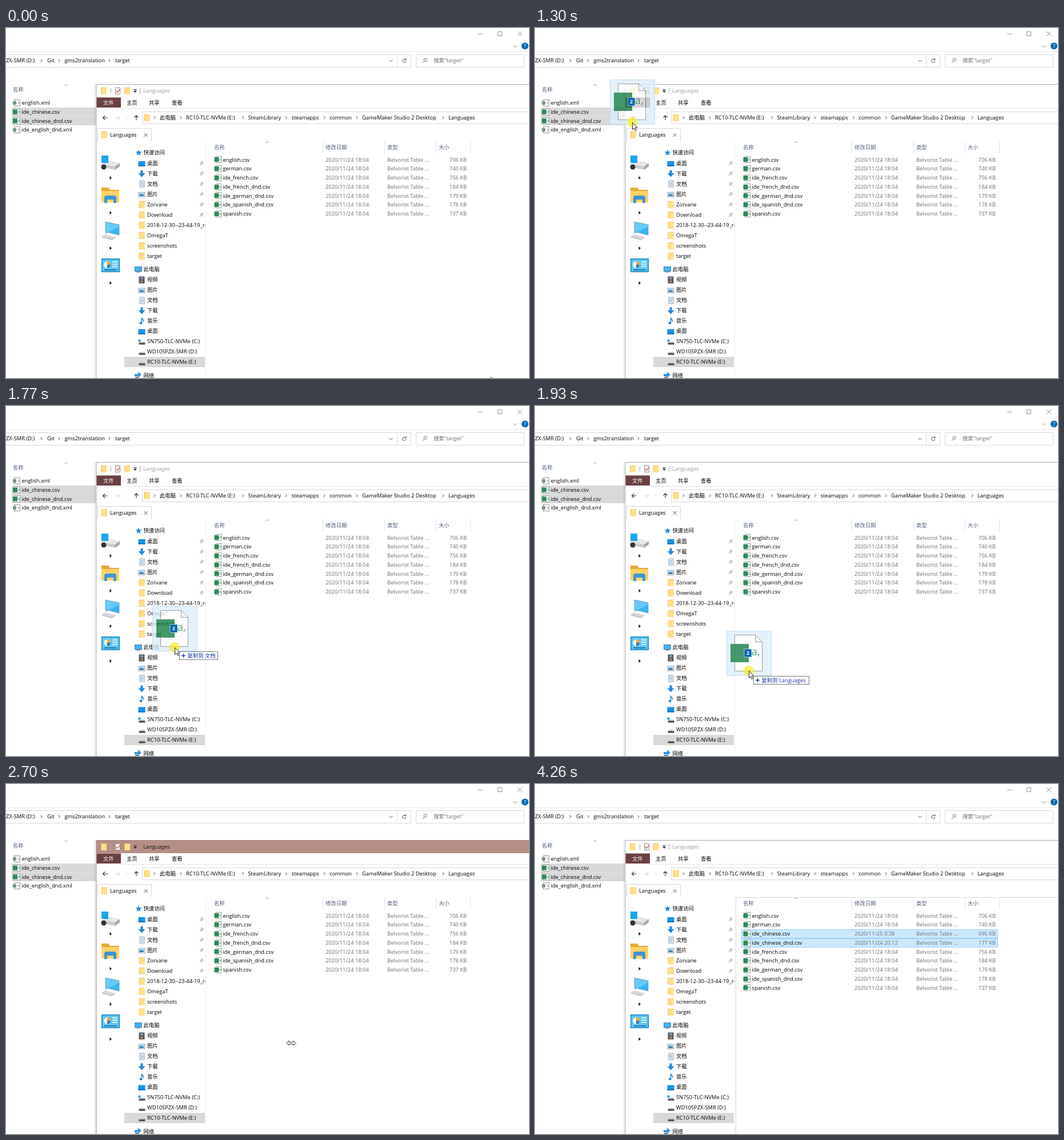
An HTML page that plays this animation: 915 px wide and 612 px high, repeating every 4330 ms.

```html
<!DOCTYPE html>
<html lang="zh">
<head>
<meta charset="utf-8">
<style>
html, body { margin: 0; width: 100%; height: 100%; overflow: hidden; background: #fff; }
svg { display: block; }
text { font: 9.33px "Open Sans", "Noto Sans CJK SC", "Noto Sans CJK", sans-serif; white-space: pre; }
</style>
</head>
<body>
<svg id="stage" width="915" height="612"></svg>
<script>
const rect = (x, y, w, h, fill, more = '') =>
  `<rect x="${x}" y="${y}" width="${w}" height="${h}" fill="${fill}" ${more}/>`;
const box = (x, y, w, h, fill, stroke) =>
  rect(x + .5, y + .5, w - 1, h - 1, fill, `stroke="${stroke}"`);
const shape = (d, fill, more = '') => `<path d="${d}" fill="${fill}" ${more}/>`;
const line = (d, stroke = '#444', w = 1, more = '') =>
  shape(d, 'none', `stroke="${stroke}" stroke-width="${w}" ${more}`);
const text = (x, y, s, fill = '#000', more = '') =>
  `<text x="${x}" y="${y + 3.4}" fill="${fill}" ${more}>${s}</text>`;
const group = (id, body) => `<g id="${id}">${body}</g>`;
const right = (x, y) => line(`M${x - 1.2} ${y - 2.4}l2.4 2.4-2.4 2.4`);
const down = (x, y, c = '#555') => line(`M${x - 3} ${y - 1.5}l3 3 3-3`, c);
const up = (x, y) => line(`M${x - 2.5} ${y + 1}l2.5-2.5 2.5 2.5`, '#777', .8);

// Small icons, each centred on x, y
const icon = {
  folder: (x, y) => rect(x - 5, y - 6, 10, 12, '#f3c65c') + rect(x - 4, y - 5, 9, 11, '#ffdf8c'),
  sheet: (x, y) => box(x - 4, y - 6, 11, 12, '#fff', '#9aa39d') +
    line(`M${x + 3} ${y - 1}h3m-3 2h3`, '#4c9a6e') + rect(x - 6, y - 4, 8, 8, '#2b8a57'),
  xml: (x, y) => box(x - 4, y - 6, 11, 12, '#fff', '#8d938f') +
    line(`M${x + 3} ${y - 2}l2 2-2 2`, '#777') + rect(x - 6, y - 3, 6, 6, '#6f9c85'),
  desktop: (x, y) => rect(x - 6, y - 4, 12, 9, '#1694ea') + rect(x - 6, y + 3, 12, 2, '#0b6fba'),
  download: (x, y) => shape(`M${x - 2} ${y - 6}h4v5h4l-6 7-6-7h4z`, '#2389dc'),
  doc: (x, y) => box(x - 4, y - 6, 9, 12, '#fff', '#8b98a5') +
    line(`M${x - 2} ${y - 2.5}h5m-5 2.5h5m-5 2.5h5`, '#4b94cf'),
  picture: (x, y) => box(x - 6, y - 4, 12, 9, '#fff', '#8d9aa6') +
    rect(x - 4, y - 2, 8, 5, '#7cc4ee') + shape(`M${x - 4} ${y + 3}v-2l3-1 5 2v1z`, '#38719a'),
  pc: (x, y) => box(x - 6, y - 5, 13, 9, '#43b4f3', '#55819f') + rect(x - 3, y + 4, 7, 1.5, '#7793a5'),
  video: (x, y) => rect(x - 5, y - 6, 10, 12, '#3b3f45') + rect(x - 2.5, y - 5, 5, 4.5, '#8295b0') +
    rect(x - 2.5, y + .5, 5, 4.5, '#a07c62') +
    line(`M${x - 4} ${y - 5}v10m8-10v10`, '#ccc', 1, 'stroke-dasharray="1 1.4"'),
  music: (x, y) => line(`M${x} ${y + 3}v-9c0 3 4 3 3 7`, '#1784d8', 1.5) +
    `<ellipse cx="${x - 1.5}" cy="${y + 3.5}" rx="2.5" ry="2" fill="#1784d8"/>`,
  drive: (x, y) => shape(`M${x - 4} ${y}h9l1 2h-11z`, '#c3c6c9') + rect(x - 5, y + 2, 11, 3, '#44484c'),
  system: (x, y) => icon.drive(x, y) + rect(x - 6, y - 4, 4, 4, '#1ba1e2'),
  star: (x, y) => shape(`M${x} ${y - 5.5}l1.5 3.7 4 .2-3.1 2.6 1.1 3.9-3.5-2.2-3.5 2.2 1.1-3.9-3.1-2.6 4-.2z`, '#2589d8'),
  network: (x, y) => shape(`M${x - 6} ${y - 2}h6v-4l6 5-6 6v-3h-6z`, '#3795d3') + rect(x - 5, y + 3, 6, 3, '#64798a'),
  pin: (x, y) => line(`M${x - 3} ${y + 3}l2.5-2.5m-1.5-2l4 4m-3-3l2-3m-.5-.5l3.5 3.5m-1-1l-3 2`, '#858c92', .9)
};

function crumbs(y, marks, labels) {
  return marks.map(x => right(x, y)).join('') + labels.map(([x, s]) => text(x, y, s)).join('');
}

const backNames = ['english.xml', 'ide_chinese.csv', 'ide_chinese_dnd.csv', 'ide_english_dnd.xml'];
const backWindow =
  line('M826 10.5h8M895 6l8 8m0-8l-8 8', '#999') + box(860, 6, 8, 8, 'none', '#999') +
  down(891, 32, '#888') + '<circle cx="908" cy="31.5" r="6" fill="#0a67ae"/>' +
  text(908, 31.5, '?', '#fff', 'text-anchor="middle" font-weight="700"') +
  rect(0, 41, 915, 1, '#e8e8e8') + box(-2, 46, 711, 23, '#fff', '#d9d9d9') + rect(684, 46, 1, 23, '#d9d9d9') +
  crumbs(57, [62, 93, 181], [[0, 'ZX-SMR (D:)'], [72, 'Git'], [102.5, 'gms2translation'], [191, 'target']]) +
  down(673.5, 57.5) + line('M698 54.8a3 3 0 1 0 1.8 2.7M700 53v2.5h-3', '#444') +
  box(717, 46, 190, 23, '#fff', '#d9d9d9') +
  line('M736.5 55.5a2.7 2.7 0 1 0-5.4 0a2.7 2.7 0 1 0 5.4 0M732 57.5l-3 3.5', '#777') +
  text(748, 57, '搜索"target"', '#6d6d6d') + text(12, 108, '名称', '#4c607a') + up(105, 100) +
  rect(10, 139, 149, 31, '#d9d9d9') + rect(10, 154, 149, 1, '#e4e4e4') +
  '<rect id="hover" x="10.5" width="149" height="15"/>' +
  backNames.map((s, i) => icon[s.endsWith('csv') ? 'sheet' : 'xml'](18, 131 + i * 15.7) +
    text(27.5, 130.7 + i * 15.75, s)).join('');

// Sidebar entries: icon, label
const quick = [['desktop', '桌面'], ['download', '下载'], ['doc', '文档'], ['picture', '图片'],
  ['folder', 'Zorvane'], ['folder', 'Download'], ['folder', '2018-12-30--23-44-19_rec'],
  ['folder', 'OmegaT'], ['folder', 'screenshots'], ['folder', 'target']];
const computer = [['video', '视频'], ['picture', '图片'], ['doc', '文档'], ['download', '下载'],
  ['music', '音乐'], ['desktop', '桌面'], ['system', 'SN750-TLC-NVMe (C:)'],
  ['drive', 'WD10SPZX-SMR (D:)'], ['drive', 'RC10-TLC-NVMe (E:)']];
const entries = (list, top) => list.map(([k, s], i) =>
  icon[k](237.5, top + i * 18 + .5) + text(247, top + i * 18, s)).join('');

const bigIcons =
  // external drive
  shape('M167 238l13-6 19 4-8 6z', '#e6e7e8') + shape('M167 238l24 4v6l-24-5z', '#c9cccf') +
  shape('M191 242l8-6v6l-8 6z', '#a3a7aa') + rect(167, 223, 12, 13, '#1ba6ee') +
  '<circle cx="171" cy="243" r="4.5" fill="#333"/>' +
  // folder
  shape('M167 279h12l3 4h16v22h-31z', '#e9a834') + rect(167, 285, 31, 20, '#ffd267') +
  shape('M172 306v-9q0-4 4-4h13q4 0 4 4v9h-5v-6h-11v6z', '#3e94d5') +
  // computer
  shape('M174 339l24 5v18l-24-6z', '#39b4f4') + shape('M174 339l24 5v3l-24 13z', '#69caf8') +
  line('M174 339l24 5v18l-24-6z', '#6d97ad', .8) + shape('M167 365l6-4 19 5-7 5z', '#d5d8da') +
  line('M168 366l17 4 6-4', '#9ba1a4', .8) +
  // control panel
  box(167, 403, 32, 24, '#36aee9', '#1680bb') + rect(169, 405, 28, 20, '#64c5f1') +
  '<circle cx="177" cy="414" r="6" fill="#e9f7ff"/>' + shape('M177 414v-6a6 6 0 0 1 6 6z', '#f5a732') +
  shape('M177 414h6a6 6 0 0 1-6 6z', '#2a7fb9') + line('M186 409h9m-9 4h9m-9 4h9', '#fff', 1.5) +
  rect(172, 422, 22, 2, '#1e78ab') +
  [262, 323, 385, 446].map(y => shape(`M181.5 ${y - 3}l3.5 3-3.5 3z`, '#111')).join('');

const sidebar = '<svg width="348.5" height="612">' + bigIcons + rect(207, 575, 141, 18, '#d9d9d9') +
  '<rect id="drop" x="207" width="141" height="18" fill="#cce8ff"/>' +
  icon.star(232, 218) + text(240.5, 218, '快速访问') + entries(quick, 236.3) +
  [0, 1, 2, 3, 4, 5].map(i => icon.pin(342, 237 + i * 18)).join('') +
  icon.pc(231, 422) + text(240.5, 422, '此电脑') + entries(computer, 440) +
  icon.network(231, 607) + text(240.5, 607.3, '网络') + '</svg>';

const gray = '#6d6d6d', noon = '2020/11/24 18:04';
const files = [['english', 706], ['german', 740], ['ide_french', 756], ['ide_french_dnd', 184],
  ['ide_german_dnd', 179], ['ide_spanish_dnd', 178], ['spanish', 737]];
const added = [['ide_chinese', 695, '2020/11/25 0:38'], ['ide_chinese_dnd', 177, '2020/11/24 20:12']];
const rows = list => list.map(([name, size, date], i) => {
  const y = 230.3 + i * 15.75;
  return (date ? box(361, Math.round(y - 8), 449, 16, '#cce8ff', '#99d1ff') : '') +
    icon.sheet(370.5, Math.round(y)) + text(379.5, y, name + '.csv') + text(559, y, date || noon, gray) +
    text(667, y, 'Belvorist Table ...', gray) + text(806, y, size + ' KB', gray, 'text-anchor="end"');
}).join('');

const frontWindow =
  [1, 2, 3, 4].map(i => rect(157 - i, 98, 1, 514, '#000', `opacity="${.1 - i * .02}"`)).join('') +
  rect(157, 98, 758, 514, '#fff') + '<rect id="title" x="158" y="98" width="757" height="23"/>' +
  line('M158 612V98.5H915', '#a9a9a9', 1, 'id="border"') +
  icon.folder(171, 110) + rect(183, 105, 1, 10, '#aaa') + box(191, 104, 9, 12, '#fff', '#8d8d8d') +
  line('M193 110l2 2.5 4-5', '#d0532c', 1.3) + icon.folder(212, 110) +
  shape('M223 109.5h6l-3 3.5z', '#222') + rect(223.5, 107, 5, 1, '#222') +
  '<rect id="bar" x="234" y="105" width="1" height="10" fill="#aaa"/>' + text(240, 110, 'Languages', '#999', 'id="caption"') +
  rect(158.5, 121.5, 42.5, 17.5, '#6b4042') + text(170, 130.3, '文件', '#fff') +
  [[211, '主页'], [250, '共享'], [290, '查看']].map(([x, s]) => text(x, 130.3, s)).join('') +
  rect(159, 140, 756, 1, '#e3e3e3') +
  line('M177.5 157h-8m3.5-3.5l-3.5 3.5 3.5 3.5M228 161v-8m-3.5 3.5l3.5-3.5 3.5 3.5', '#333', 1.1) +
  line('M191 157h8m-3.5-3.5l3.5 3.5-3.5 3.5', '#ccc') + down(212.5, 157, '#ddd') +
  box(238, 146, 690, 22, '#fff', '#d9d9d9') + icon.folder(246.5, 157) +
  crumbs(156.7, [260, 306, 414.5, 490, 557, 614, 765],
    [[269, '此电脑'], [315, 'RC10-TLC-NVMe (E:)'], [423.5, 'SteamLibrary'], [499.5, 'steamapps'],
     [566, 'common'], [623, 'GameMaker Studio 2 Desktop'], [774, 'Languages']]) +
  line('M160.5 198v-22.5h94v22.5', '#d6d6d6') + icon.folder(172, 186.5) + text(182, 186.5, 'Languages') +
  line('M241.5 184l6 6m0-6l-6 6', '#555') + sidebar + rect(349, 198, 1, 414, '#f2f2f2') +
  group('frame', line('M351.5 612V198.5H915', '#d9d9d9')) +
  [[364, '名称'], [559, '修改日期'], [667, '类型'], [757, '大小']].map(([x, s]) => text(x, 208.3, s, '#4c607a')).join('') +
  [554, 662, 752, 812].map(x => rect(x, 198, 1, 21, '#e3e3e3')).join('') + up(457, 200) +
  group('before', rows(files)) + group('after', rows([...files.slice(0, 2), ...added, ...files.slice(2)]));

const ghost = group('ghost', '<g opacity=".78">' + box(0, 0, 79, 79, '#dceefa', '#b4d8ee') +
  shape('M14.5 7.5h36l12 12v51h-48z', '#fbfcfc', 'stroke="#858585"') + line('M50.5 7.5v12h12', '#858585') +
  text(43.5, 40, 'a,', '#2a9360', 'style="font-size:19px"') + rect(7, 23, 32, 32, '#107c41') + '</g>' +
  rect(31, 32, 13, 14, '#0063b1', 'stroke="#fff" stroke-width=".6"') +
  text(37.5, 39, '2', '#fff', 'text-anchor="middle" style="font-weight:700"'));

const tip = group('tip', '<rect id="tipBox" x=".5" y=".5" height="14" fill="#fff" stroke="#777"/>' +
  line('M4 7.5h7m-3.5-3.5v7', '#1d3fb0', 1.5) + text(14.5, 7.7, '', '#12329c', 'id="tipText"'));

const pointer = group('pointer', '<circle id="press" r="9" fill="#f7ee2b" opacity=".72"/>' +
  group('arrow', shape('M.5 .5v12l2.8-2.6 2 4.6 2-.9-2-4.5h3.7z', '#fff', 'stroke="#111" stroke-width=".9"')) +
  group('resize', shape('M-8.5 0l4.500-4v2.500h8v-2.500l4.500 4-4.500 4v-2.500h-8v2.500z'.replace(/00/g, ''), '#fff', 'stroke="#222" stroke-width=".9"')));

stage.innerHTML = backWindow + frontWindow + ghost + pointer + tip;

const el = id => document.getElementById(id);
const show = (id, on) => el(id).style.display = on ? '' : 'none';
const move = (id, x, y) => el(id).setAttribute('transform', `translate(${x} ${y})`);
const set = (id, attrs) => { for (const k in attrs) el(id).setAttribute(k, attrs[k]); };

// Pointer path: step, x, y
const path = [[0, 848, 610], [1, 800, 570], [2, 650, 440], [3, 430, 270], [4, 230, 165], [5, 110, 132],
  [6, 62, 136], [7, 48, 150], [8, 52.5, 150], [10, 53, 149.5], [13, 55, 150], [15, 55, 152],
  [16, 170, 165], [17, 390, 190], [18, 502, 220], [19, 360, 255], [20, 238.5, 290], [21, 240, 327],
  [22, 262, 380], [23, 295, 422], [24, 335, 450], [25, 374, 463], [26, 425, 464], [27, 470, 459],
  [28, 497, 454], [29, 499, 453], [37, 499, 453], [38, 471, 454], [43, 471, 454], [44, 469, 452],
  [45, 469, 452], [46, 490, 462], [48, 680, 535], [50, 830, 598], [51, 852, 616], [56, 852, 616]];

function pointAt(n) {
  const i = path.findIndex(p => p[0] >= n), b = path[i], a = path[i - 1] || b;
  const k = b === a ? 0 : (n - a[0]) / (b[0] - a[0]);
  return [a[1] + (b[1] - a[1]) * k, a[2] + (b[2] - a[2]) * k];
}

const LOOP = 4330, STEPS = 56;

function draw(now) {
  // The screen advances in even steps
  const n = Math.floor((now % LOOP + 8) / LOOP * STEPS) % STEPS;
  const [x, y] = pointAt(n);
  const drag = n >= 15 && n < 29, active = n >= 35 && n < 55, copied = n >= 37;
  const row = Math.floor((y - 123) / 15.75), selected = row === 1 || row === 2;

  show('hover', !drag && x < 158 && row >= 0 && row < 4);
  set('hover', { y: 123.5 + Math.round(row * 15.75), fill: selected ? '#cce8ff' : '#e5f3ff',
    stroke: selected ? '#99d1ff' : 'none' });

  const inSidebar = x >= 207 && x < 349;
  show('drop', drag && inSidebar && y > 227 && y < 407);
  set('drop', { y: 210 + Math.floor((y - 209) / 18) * 18 });

  set('title', { fill: active ? '#b58f87' : '#fff' });
  set('border', { stroke: active ? '#a5827b' : '#a9a9a9' });
  set('caption', { fill: active ? '#111' : '#999' });
  show('bar', !active);
  show('before', !copied);
  show('after', copied);
  show('frame', copied);

  const lag = Math.min(5, Math.max(0, n - 20));
  show('ghost', drag);
  move('ghost', Math.round(x - 39.4), Math.round(y - 75 + lag));
  show('tip', drag && x >= 207);
  move('tip', Math.round(x + 7.6), Math.round(y + 4 + lag));
  el('tipText').textContent = '复制到 ' + (inSidebar ? '文档' : 'Languages');
  set('tipBox', { width: inSidebar ? 67 : 97 });

  move('pointer', x, y);
  show('press', drag);
  const sizing = n >= 29 && n < 38;
  show('arrow', !sizing);
  show('resize', sizing);
}

const start = performance.now();
function tick() {
  draw(performance.now() - start);
  requestAnimationFrame(tick);
}
tick();
</script>
</body>
</html>
```
